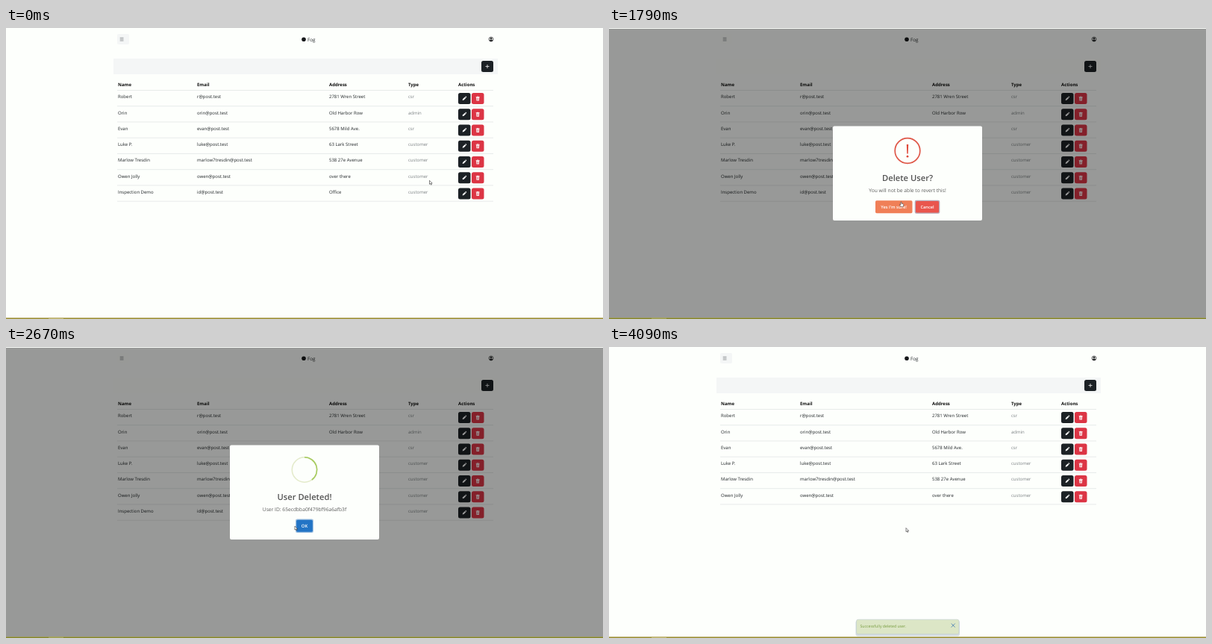
Animation of 800 by 390 pixels, one loop 4120 ms. Source, as an HTML page:

```html
<!DOCTYPE html>
<html lang="en">
<head>
<meta charset="utf-8">
<title>User table</title>
<style>
  html, body { margin: 0; width: 100%; height: 100%; overflow: hidden; background: #fdfffc; }
  svg { display: block; width: 800px; height: 390px; }
  text { font: 6px "Open Sans", "Noto Sans", sans-serif; fill: #212529; text-rendering: geometricPrecision; }
  .bold { font-weight: 700; fill: #111; }
  .muted { fill: #7d8286; }
  .mid { text-anchor: middle; }
  .title { font-size: 11.2px; font-weight: 600; fill: #545454; }
  .note { font-size: 6.7px; fill: #5c5c5c; }
  .label { font-weight: 600; fill: #fff; }
</style>
</head>
<body>
<svg id="stage" viewBox="0 0 800 390">
  <defs>
    <g id="pencil" fill="#fff">
      <path d="M-2.6 2.6l.6-2L.7-2.1 2.1-.7-.6 2z"/>
      <path d="M1.1-2.5l.5-.4q.3-.2.6 0l.7.7q.2.3 0 .6l-.4.5z"/>
    </g>
    <g id="trash">
      <path fill="#fff" d="M-2.5-2.6h1.6l.3-.5h1.2l.3.5h1.6v.8h-5zM-2.1-1.4h4.2l-.3 4q0 .5-.6.5h-2.4q-.6 0-.6-.5z"/>
      <path stroke="#dc3545" stroke-width=".45" d="M-.9-.6v2.8M0-.6v2.8M.9-.6v2.8"/>
    </g>
  </defs>

  <rect width="800" height="390" fill="#fdfffc"/>
  <g id="soft" fill="#f4f6f6">
    <rect x="149" y="8" width="16" height="14" rx="2"/>
    <rect x="144" y="41" width="515" height="21"/>
  </g>
  <path d="M152.7 13.2h4.8M152.7 15.1h4.8M152.7 17h4.8" stroke="#6b7073" stroke-width=".65"/>
  <circle cx="399" cy="15.3" r="2.8" fill="#17191b"/>
  <text x="404" y="17.6" style="font-size:6.3px">Fog</text>
  <g fill="none" stroke="#17191b" stroke-width=".7">
    <circle cx="650" cy="15" r="2.9"/>
    <circle cx="650" cy="14.2" r="1" fill="#17191b"/>
    <path d="M648 17q2-2.2 4 0l-2 .8z" fill="#17191b"/>
  </g>
  <rect x="637" y="44" width="16" height="15" rx="2.5" fill="#1c2125"/>
  <path d="M642.5 51.5h5M645 49v5" stroke="#fff" stroke-width=".75"/>
  <g id="table"></g>

  <rect id="dim" y="1" width="800" height="387.5"/>
  <rect y="388.4" width="800" height="1.6" fill="#9c8f35"/>
  <rect x="57" y="388.4" width="20" height="1.6" fill="#c2b877"/>
  <rect id="barDim" y="388.4" width="800" height="1.6" fill="#4a6a10"/>

  <g id="ask">
    <rect x="300" y="131.5" width="200" height="126.5" rx="2" fill="#fdfffc"/>
    <g id="warn">
      <circle r="16.8" fill="none" stroke="#df5748" stroke-width="1.7"/>
      <path d="M-1.2-8.5h2.4l-.5 12.6h-1.4z" fill="#df4a3b"/>
      <circle cy="7.7" r="1.4" fill="#df4a3b"/>
    </g>
    <text class="mid title" x="400" y="205">Delete User?</text>
    <text class="mid note" x="400" y="219.6">You will not be able to revert this!</text>
    <g class="actions">
      <rect x="357" y="231.2" width="49.5" height="17" rx="1.7" fill="#f07f57"/>
      <rect x="409.7" y="230.7" width="33.6" height="18" rx="2.2" fill="#b9a9b6"/>
      <rect x="411" y="232" width="31" height="15.5" rx="1.5" fill="#e9554d"/>
      <text class="mid label" x="381.6" y="242.2" style="font-size:5.8px">Yes I'm sure!</text>
      <text class="mid label" x="426.5" y="242.2" style="font-size:5.7px">Cancel</text>
    </g>
  </g>

  <g id="done">
    <rect x="300" y="131.5" width="200" height="126.5" rx="2" fill="#fdfffc"/>
    <circle cx="400" cy="164.5" r="16.7" fill="none" stroke="#e4ebcb" stroke-width="1.6"/>
    <path id="arc" fill="none" stroke="#a8cc62" stroke-width="1.6"/>
    <path id="check" d="M390.3 164.7L396.4 170.8 409.7 157.4" pathLength="1" fill="none" stroke="#b0c945" stroke-width="2.1"/>
    <text class="mid title" x="400" y="205">User Deleted!</text>
    <text class="mid note" x="400" y="219.6">User ID: 65ecdbba0f479bf96a6afb3f</text>
    <g class="actions">
      <rect x="388" y="230.5" width="24" height="18.5" rx="2.3" fill="#9fc0e0"/>
      <rect x="389.2" y="231.7" width="21.6" height="16.1" rx="1.6" fill="#2274c5"/>
      <text class="mid label" x="400" y="242.2">OK</text>
    </g>
  </g>

  <g id="toast">
    <rect x="330.5" y="366.5" width="139.5" height="21" rx="3" fill="#aebccb" opacity=".5"/>
    <rect x="331.5" y="365.2" width="137.5" height="19.6" rx="2.5" fill="#dce6c6" stroke="#c3d0cf" stroke-width=".7"/>
    <text x="336.5" y="375.6" style="font-size:5.2px;fill:#759a3c">Successfully deleted user.</text>
    <path d="M458.7 370.6l5 5M463.7 370.6l-5 5" stroke="#4f83b5" stroke-width=".9"/>
  </g>

  <g id="arrow">
    <path d="M0 0v5.1l1.2-1 .8 1.8.9-.4-.8-1.7h1.6z" fill="#fff" stroke="#222" stroke-width=".55"/>
  </g>
  <g id="hand">
    <path d="M-.6.2q.6-.6 1.1 0v2l2.2.6q.7.2.6 1l-.5 2.5H-.6L-2 4.1q-.1-.8.6-.7l.8.6z" fill="#fff" stroke="#222" stroke-width=".5"/>
  </g>
</svg>

<script>
const LOOP = 4120;
const ASK_OPEN = 1180, ASK_CLOSE = 2215, DONE_OPEN = 2315, DONE_CLOSE = 3666, REMOVED = 3940;
const HOVER_ON = 500, HOVER_OFF = 1330;
const SHADE_LEAD = 15, HIDE = 150;

const users = [
  ["Robert", "r@post.test", "2781 Wren Street", "csr"],
  ["Orin", "orin@post.test", "Old Harbor Row", "admin"],
  ["Evan", "evan@post.test", "5678 Mild Ave.", "csr"],
  ["Luke P.", "luke@post.test", "63 Lark Street", "customer"],
  ["Marlow Tresdin", "marlow7tresdin@post.test", "538 27e Avenue", "customer"],
  ["Owen Jolly", "owen@post.test", "over there", "customer"],
  ["Inspection Demo", "id@post.test", "Office", "customer"]
];
const columns = [150, 256, 433, 539, 606];

const $ = id => document.getElementById(id);
const clamp = v => Math.min(1, Math.max(0, v));
const part = (t, start, length) => clamp((t - start) / length);
const mix = (a, b, p) => a + (b - a) * p;

// CSS "ease": cubic-bezier(.25, .1, .25, 1)
function ease(x) {
  if (x <= 0 || x >= 1) return clamp(x);
  let lo = 0, hi = 1, u = x;
  for (let i = 0; i < 20; i++) {
    u = (lo + hi) / 2;
    if (.75 * u * (1 - u) + u ** 3 < x) lo = u; else hi = u;
  }
  return .3 * u * (1 - u) ** 2 + 3 * u * u * (1 - u) + u ** 3;
}

// Value at p from [offset, value] steps, eased between neighbours
function track(steps, p) {
  for (let i = 1; i < steps.length; i++) {
    const [a, from] = steps[i - 1], [b, to] = steps[i];
    if (p <= b) return mix(from, to, ease(clamp((p - a) / (b - a))));
  }
  return steps[steps.length - 1][1];
}

function cells(values, y, cls) {
  return values.map((v, i) =>
    `<text x="${columns[i]}" y="${y}" class="${cls || (i === 3 ? "muted" : "")}">${v}</text>`).join("");
}

function row(user, i) {
  const y = 94.5 + 21.25 * i;
  return `<g id="row${i}">${cells(user, y - .2)}
    <rect x="606" y="${y - 7.5}" width="16.5" height="15" rx="2.5" fill="#1c2125"/>
    <use href="#pencil" x="614.2" y="${y}"/>
    <rect class="del" x="624" y="${y - 7.5}" width="16.5" height="15" rx="2.5" fill="#dc3545"/>
    <use href="#trash" x="632.2" y="${y}"/>
    <path d="M149 ${y + 10.2}H653" stroke="#dfe3e3" stroke-width=".7"/></g>`;
}

$("table").innerHTML = cells(["Name", "Email", "Address", "Type", "Actions"], 78.4, "bold") +
  `<path d="M149 83.5H653" stroke="#dfe3e3" stroke-width=".7"/>` + users.map(row).join("");
const lastRow = $("row6"), lastDelete = lastRow.querySelector(".del");

const pop = [[0, .7], [.45, 1.05], [.8, .95], [1, 1]];
const cursorPath = [
  [0, 567.5, 204.3], [60, 567.5, 204.3], [560, 632, 219.5], [1300, 632, 219.5],
  [1660, 391.5, 233], [2220, 391.5, 233], [2330, 386.5, 240.5], [2780, 387, 240],
  [3180, 398, 242.5], [LOOP, 398, 242.5]
];

function drawDialog(node, t, open, close, end) {
  const shown = t >= open && t < end;
  node.style.display = shown ? "" : "none";
  if (!shown) return;
  const hide = ease(part(t, close, HIDE));
  const scale = t < close ? track(pop, (t - open) / 300) : mix(1, .5, hide);
  node.setAttribute("transform", `translate(400 195) scale(${scale}) translate(-400 -195)`);
  node.setAttribute("opacity", 1 - hide);
  // Buttons are disabled while the dialog closes
  node.querySelector(".actions").setAttribute("opacity", t < close ? 1 : .4);
}

const shadeOf = (t, open, close) =>
  ease(part(t, open - SHADE_LEAD, 100)) * (1 - ease(part(t, close, 100)));

function arcPath(from, to) {
  const point = deg => {
    const a = (deg - 90) * Math.PI / 180;
    return `${400 + 16.7 * Math.cos(a)} ${164.5 + 16.7 * Math.sin(a)}`;
  };
  return to - from < 1 ? "" : `M${point(from)}A16.7 16.7 0 ${to - from > 180 ? 1 : 0} 1 ${point(to)}`;
}

function drawCursor(t) {
  let i = 1;
  while (i < cursorPath.length - 1 && t > cursorPath[i][0]) i++;
  const [t0, x0, y0] = cursorPath[i - 1], [t1, x1, y1] = cursorPath[i];
  const p = ease(clamp((t - t0) / (t1 - t0)));
  const pointing = (t > HOVER_ON && t < HOVER_OFF) || (t > 1600 && t < 2240) || (t > 2860 && t < DONE_CLOSE);
  for (const [id, on] of [["arrow", !pointing], ["hand", pointing]]) {
    $(id).style.display = on ? "" : "none";
    $(id).setAttribute("transform", `translate(${mix(x0, x1, p)} ${mix(y0, y1, p)})`);
  }
}

function render(t) {
  drawDialog($("ask"), t, ASK_OPEN, ASK_CLOSE, DONE_OPEN);
  drawDialog($("done"), t, DONE_OPEN, DONE_CLOSE, DONE_CLOSE + HIDE);
  const shade = Math.max(shadeOf(t, ASK_OPEN, ASK_CLOSE), shadeOf(t, DONE_OPEN, DONE_CLOSE));
  $("dim").setAttribute("opacity", .4 * shade);
  $("barDim").setAttribute("opacity", .3 * shade);
  $("soft").setAttribute("opacity", 1 - .9 * shade * shade);

  const tilt = ease(part(t, ASK_OPEN, 500));
  const flat = Math.cos(mix(100, 0, tilt) * Math.PI / 180);
  $("warn").setAttribute("transform", `translate(400 164.5) scale(1 ${flat})`);
  $("warn").setAttribute("opacity", tilt);

  const age = t - DONE_OPEN;
  const head = -30 + 360 * (age - 212) / 298;
  const turn = v => Math.min(359.9, Math.max(0, v));
  $("arc").setAttribute("d", arcPath(turn(head - 180), turn(head)));
  const drawn = ease(part(age, 405, 300));
  $("check").setAttribute("stroke-dasharray", `${drawn} 2`);
  $("check").style.display = drawn > 0 ? "" : "none";

  const hover = ease(part(t, HOVER_ON, 150)) * (1 - ease(part(t, HOVER_OFF, 150)));
  lastDelete.setAttribute("fill", `rgb(${mix(220, 176, hover)},${mix(53, 38, hover)},${mix(69, 50, hover)})`);
  lastRow.style.display = t < REMOVED ? "" : "none";
  $("toast").setAttribute("opacity", part(t, REMOVED, 150));
  drawCursor(t);
}

function tick() {
  render(performance.now() % LOOP);
  requestAnimationFrame(tick);
}
tick();
</script>
</body>
</html>
```
